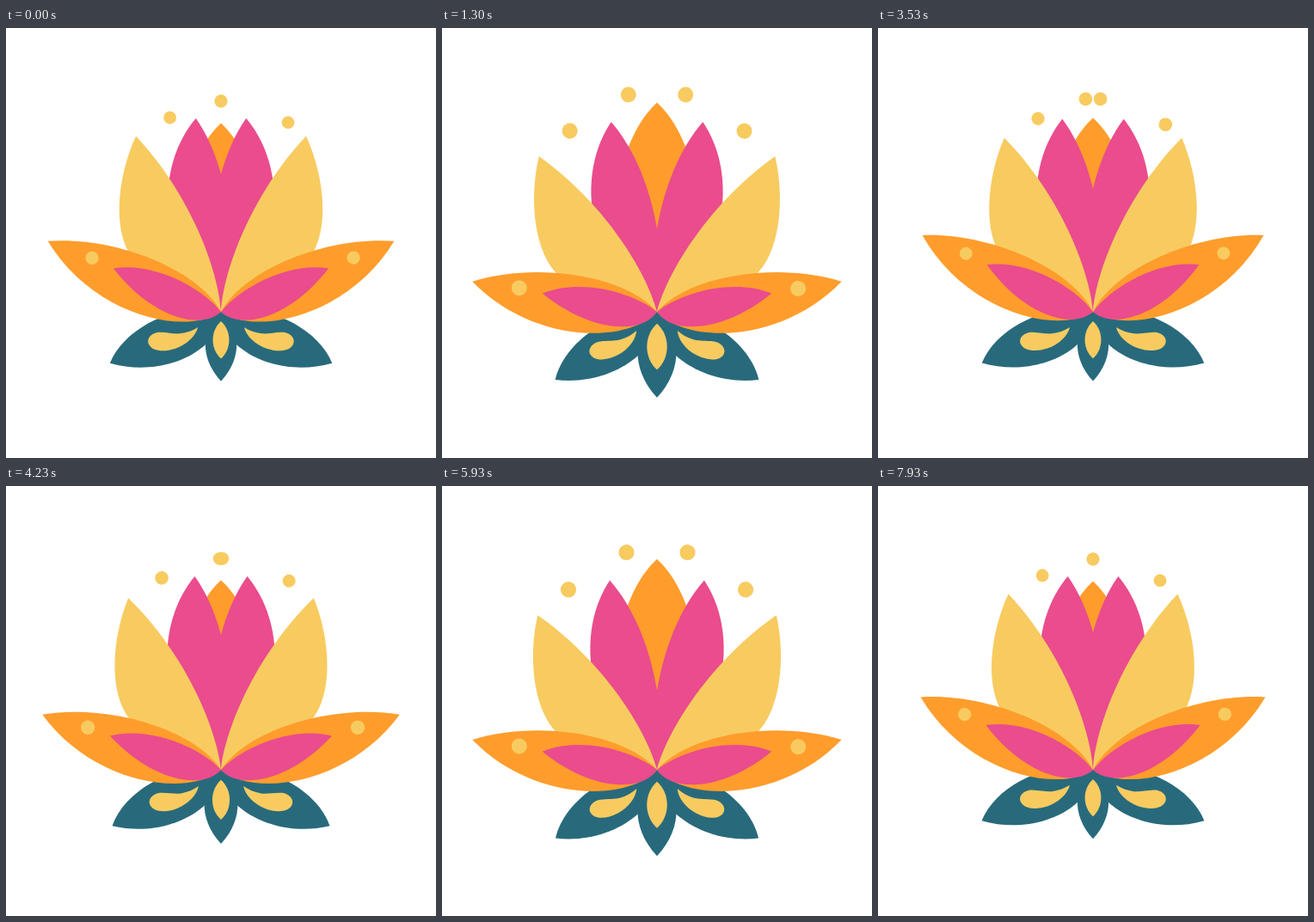
Write an HTML page with a canvas that moves like this. It is 500 px wide and 500 px high and loops after 8.01 s.

```html
<!DOCTYPE html>
<html lang="en">
<head>
<meta charset="utf-8">
<title>Lotus</title>
<style>
  html, body { margin: 0; width: 100%; height: 100%; overflow: hidden; background: #fff; }
  canvas { display: block; width: 500px; height: 500px; }
</style>
</head>
<body>
<canvas id="stage"></canvas>
<script>
const canvas = document.getElementById('stage');
const ctx = canvas.getContext('2d');
const ratio = window.devicePixelRatio || 1;
canvas.width = canvas.height = 500 * ratio;

const YELLOW = '#f8cb60', ORANGE = '#ff9d2c', PINK = '#ea4c8d', TEAL = '#286a7c';
const LOOP = 8010, STEPS = 160, CYCLE = 80;
const BASE = { x: 250, y: 330 };

// Petals lie along +x, with the root at the origin.
const shape = {
  outer: new Path2D('M0 0C45 -37 150 -34 217.5 0C137 60 28 43 0 0Z'),
  outerInset: new Path2D('M0 0C30 -17 93 -25 135 .5C70 38 12 28 0 0Z'),
  yellow: new Path2D('M0 0C45 -19 140 -27.5 227 0C195 39 140 74 100 65C60 58 20 30 0 0Z'),
  pink: new Path2D('M0 0C35 -21 150 -40 227 0C205 24 168 46 110 47C60 45 20 25 0 0Z'),
  leaf: new Path2D('M0 0C30 -28 105 -35 142.3 0C90 45 15 38 0 0Z'),
  drop: new Path2D('M32 5C38 13 52 18 66 16.5C80 15 92 8 92 -1C92 -9 82 -12 74 -8C66 -4 60 1 54 3C46 5.5 39 6 32 5Z'),
  crown: new Path2D('M0 0C16 14 40 50 44 100Q44 150 0 215Q-44 150 -44 100C-40 50 -16 14 0 0Z'),
  stem: new Path2D('M0 0C22 18 26 52 0 80C-26 52 -22 18 0 0Z'),
  stemInset: new Path2D('M0 11C12.5 22 12.5 43 0 54C-12.5 43 -12.5 22 0 11Z')
};

const mix = (a, b, p) => a + (b - a) * p;

// Cubic Bezier ease from (0,0) to (1,1) with handles (x1,0) and (x2,1).
function ease(x, x1, x2) {
  let lo = 0, hi = 1, s = 0.5;
  for (let i = 0; i < 24; i++) {
    s = (lo + hi) / 2;
    const bx = 3 * (1 - s) * (1 - s) * s * x1 + 3 * (1 - s) * s * s * x2 + s * s * s;
    if (bx < x) lo = s; else hi = s;
  }
  return s * s * (3 - 2 * s);
}

// How far a part is open: 0 at step "closed", 1 half a cycle away.
function openness(step, closed, x1, x2) {
  const half = CYCLE / 2;
  const away = Math.abs((step - closed + half + CYCLE * 2) % CYCLE - half);
  return ease(away / half, x1, x2);
}

function fill(path, color) {
  ctx.fillStyle = color;
  ctx.fill(path);
}

function dot(x, y, r) {
  ctx.fillStyle = YELLOW;
  ctx.beginPath();
  ctx.arc(x, y, r, 0, Math.PI * 2);
  ctx.fill();
}

// Draws in petal space; elevation is in degrees above the horizon.
function along(side, elevation, draw) {
  ctx.save();
  ctx.translate(BASE.x, BASE.y);
  ctx.scale(side, 1);
  ctx.rotate(-elevation * Math.PI / 180);
  draw(side);
  ctx.restore();
}

function pair(elevation, draw) {
  along(-1, elevation, draw);
  along(1, elevation, draw);
}

function render(step) {
  const inner = openness(step, 80, 0.4, 0.06);
  const middle = openness(step, 77.1, 0.33, 0.11);
  const leaf = openness(step, 75.3, 0.35, 0.15);
  const outer = openness(step, 73, 0.35, 0.15);

  ctx.setTransform(ratio, 0, 0, ratio, 0, 0);
  ctx.fillStyle = '#fff';
  ctx.fillRect(0, 0, 500, 500);

  pair(-mix(24.3, 34, leaf), () => {
    fill(shape.leaf, TEAL);
    fill(shape.drop, YELLOW);
  });
  ctx.save();
  ctx.translate(BASE.x, BASE.y);
  const size = mix(0.995, 1.255, leaf);
  ctx.scale(size, size);
  fill(shape.stem, TEAL);
  fill(shape.stemInset, YELLOW);
  ctx.restore();

  ctx.save();
  ctx.translate(BASE.x, mix(110.8, 85, inner));
  fill(shape.crown, ORANGE);
  ctx.restore();

  pair(90 - mix(7.4, 14, inner), () => fill(shape.pink, PINK));
  pair(90 - mix(25.6, 37.7, middle), () => fill(shape.yellow, YELLOW));
  pair(mix(24.3, 9.1, outer), side => {
    fill(shape.outer, ORANGE);
    fill(shape.outerInset, PINK);
    dot(side < 0 ? 162.5 : 166.4, side < 0 ? -1.3 : 0, mix(7.4, 9, outer));
  });

  const innerSize = mix(7.4, 9.1, inner);
  pair(90 - mix(0, 8, inner), () => dot(mix(245, 255.3, inner), 0, innerSize));
  along(1, 90 - mix(19.5, 26.2, inner), () => dot(233.5, 0, innerSize));
  along(-1, 90 - mix(14.5, 26.2, middle), () => dot(233.5, 0, mix(7.4, 9.1, middle)));
}

// Steps alternate between 30 ms and 70 ms.
function stepAt(ms) {
  const t = ms % LOOP;
  const step = 2 * Math.floor(t / 100) + (t % 100 >= 30 ? 1 : 0);
  return Math.min(step, STEPS - 1);
}

const start = performance.now();
function tick() {
  render(stepAt(Math.max(0, performance.now() - start)));
  requestAnimationFrame(tick);
}
tick();
</script>
</body>
</html>
```
